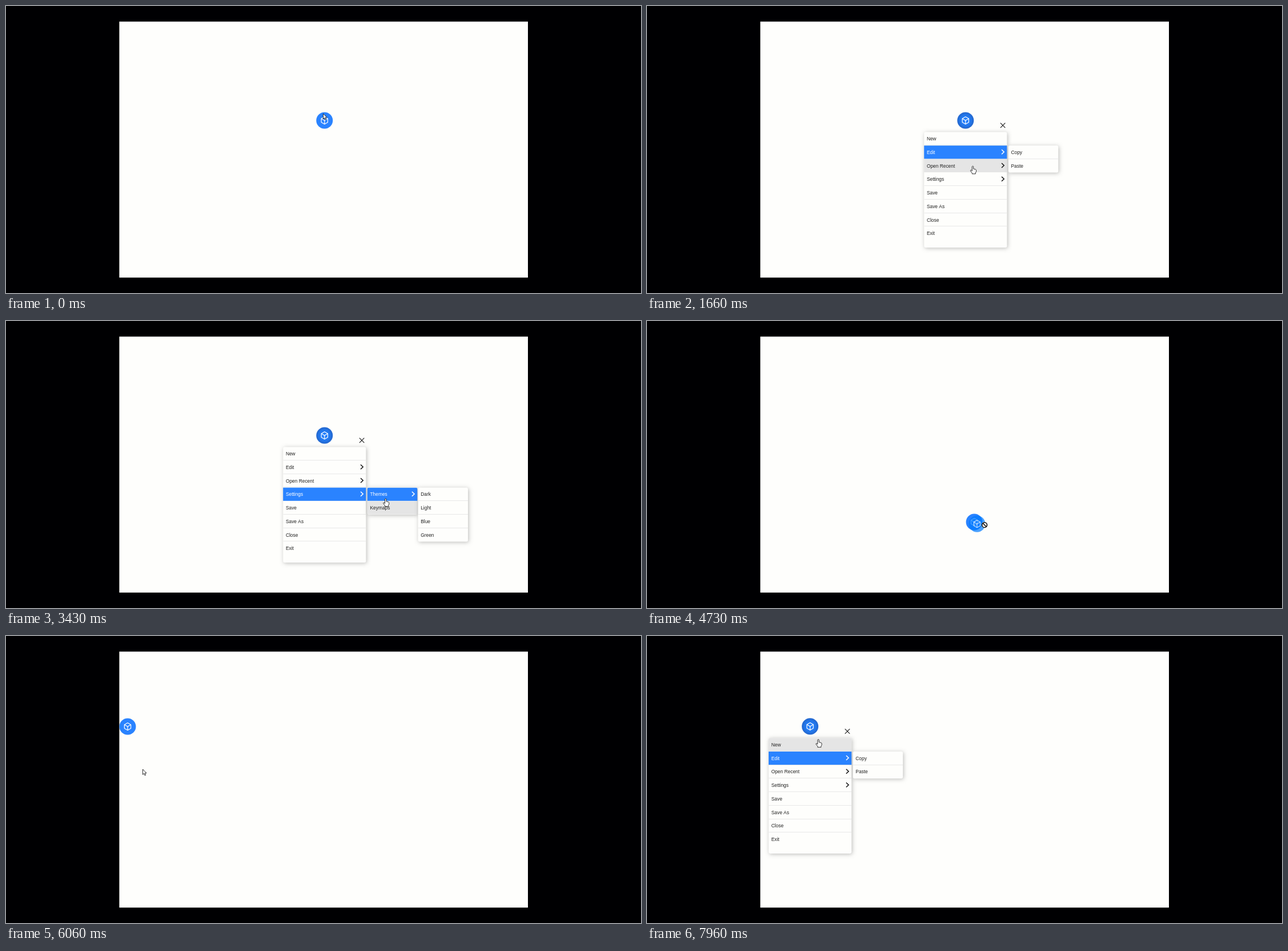
These frames come from a looping animation (1112 by 504 pixels, 8 s). An HTML page with a canvas:

```html
<!DOCTYPE html>
<html lang="en">
<head>
<meta charset="utf-8">
<title>Floating menu</title>
<style>
html, body { margin: 0; width: 100%; height: 100%; overflow: hidden; background: #000002; }
canvas { display: block; }
</style>
</head>
<body>
<canvas id="stage" width="1112" height="504"></canvas>
<script>
const ctx = document.getElementById('stage').getContext('2d');
const LOOP = 8000, LAG = 30, ROW = 23.75;
const PAPER = '#fefefc', BLUE = '#2a83ff', INK = '#222';
const DRAG = { from: 4430, to: 5390, dx: -13.2, dy: -2 };

const MAIN = ['New', 'Edit', 'Open Recent', 'Settings', 'Save', 'Save As', 'Close', 'Exit'];
const EDIT = ['Copy', 'Paste'];
const SETTINGS = ['Themes', 'Keymaps'];
const THEMES = ['Dark', 'Light', 'Blue', 'Green'];
const PARENTS = ['Edit', 'Open Recent', 'Settings', 'Themes'];

// each gesture runs from the last resting place through evenly timed points
const HOME = [555.5, 189];
const GESTURES = [
  { from: 900, to: 1660, via: [[577, 301], [571, 257], [570.5, 281]] },
  { from: 1930, to: 2730, via: [[578, 302], [706, 332], [690, 332]] },
  { from: 2760, to: 3560, via: [[678, 318], [664, 306], [662, 304], [669.5, 324.7], [637, 237]] },
  { from: 3600, to: 4360, via: [[623, 209], [623, 209], [571, 203]] },
  { from: DRAG.from, to: DRAG.to,
    via: [[565, 330], [592.5, 361], [575, 386], [400, 270], [266, 161], [226.2, 161]] },
  { from: 5600, to: 6060, via: [[239.5, 234]] },
  { from: 6130, to: 6260, via: [[207, 153]] },
  { from: 6900, to: 7360, via: [[222, 170], [258.3, 262]] },
  { from: 7360, to: 7660, via: [[290, 249.5]] },
  { from: 7730, to: 7960, via: [[296, 218], [300, 181.5]] }
];

// smooth curve through points, at rest at both ends
function spline(points, k) {
  const last = points.length - 1;
  const i = Math.min(last - 1, Math.floor(k * last)), u = k * last - i;
  const slope = (j, c) => j === 0 || j === last ? 0 : (points[j + 1][c] - points[j - 1][c]) / 2;
  const h = u * u * (3 - 2 * u);
  return [0, 1].map(c => points[i][c] * (1 - h) + points[i + 1][c] * h
    + u * (1 - u) * ((1 - u) * slope(i, c) - u * slope(i + 1, c)));
}

function pointer(t) {
  let rest = HOME;
  for (const g of GESTURES) {
    if (t < g.from) break;
    rest = spline([rest, ...g.via], Math.min(1, (t - g.from) / (g.to - g.from)));
  }
  return { x: rest[0], y: rest[1] };
}

function menuOrigin(t) {
  if (t >= 360 && t < 3860) return { x: 485.4, y: 221.2 };
  if (t >= 6600) return { x: 213.2, y: 179 };
  return null;
}

function panels(t) {
  const o = menuOrigin(t);
  if (!o) return [];
  const edit = (t >= 1430 && t < 2200) || t >= 7850;
  const settings = t >= 2200 && t < 3860;
  const themes = settings && t >= 3150;
  const list = [{ x: o.x, y: o.y, w: 145, h: 203, items: MAIN, sel: edit ? 1 : settings ? 3 : -1 }];
  const sub = (x, row, items, sel) =>
    list.push({ x: o.x + x, y: o.y + row * ROW, w: 87.3, h: items.length * ROW, items, sel });
  if (edit) sub(147.6, 1, EDIT, -1);
  if (settings) sub(147.6, 3, SETTINGS, themes ? 0 : -1);
  if (themes) sub(236.3, 3, THEMES, -1);
  return list;
}

const inside = (p, b) => p.x >= b.x && p.x < b.x + b.w && p.y >= b.y && p.y < b.y + b.h;

function stroke(points, color, width, close) {
  ctx.beginPath();
  points.forEach(([x, y]) => ctx.lineTo(x, y));
  if (close) ctx.closePath();
  ctx.strokeStyle = color;
  ctx.lineWidth = width;
  ctx.stroke();
}

function drawPanel(b, p) {
  ctx.save();
  ctx.beginPath();
  ctx.roundRect(b.x - .2, b.y, b.w + .2, b.h, 3);
  ctx.fillStyle = PAPER;
  ctx.shadowColor = 'rgba(0,0,0,.26)';
  ctx.shadowBlur = 7;
  ctx.shadowOffsetX = ctx.shadowOffsetY = 1.2;
  ctx.fill();
  ctx.shadowColor = 'transparent';
  ctx.clip();
  const hover = inside(p, b) ? Math.floor((p.y - b.y) / ROW) : -1;
  b.items.forEach((label, i) => {
    const y = b.y + i * ROW, mid = y + ROW / 2, on = i === b.sel;
    if (i < b.items.length - 1) {
      ctx.fillStyle = '#e8e8e8';
      ctx.fillRect(b.x, Math.round(y + ROW) - 1, b.w, 1);
    }
    if (on || i === hover) {
      ctx.fillStyle = on ? BLUE : '#e5e5e5';
      ctx.fillRect(b.x - 1, y + .2, b.w + 2, ROW - .6);
    }
    ctx.fillStyle = on ? '#fff' : INK;
    ctx.fillText(label, b.x + 4.5, Math.round(mid + 3));
    if (PARENTS.includes(label)) {
      const x = b.x + b.w - 9.4;
      stroke([[x, mid - 4.6], [x + 4.2, mid - .6], [x, mid + 3.4]], on ? '#fff' : '#111', 1.5);
    }
  });
  ctx.restore();
}

function drawButton(x, y, fill) {
  ctx.beginPath();
  ctx.arc(x, y, 14.5, 0, 7);
  ctx.fillStyle = fill;
  ctx.fill();
  const hex = [0, 1, 2, 3, 4, 5].map(i => {
    const a = (i * 60 - 90) * Math.PI / 180;
    return [x + 6.5 * Math.cos(a), y + 6.5 * Math.sin(a)];
  });
  ctx.lineJoin = 'round';
  stroke(hex, '#fff', 1.2, true);
  stroke([hex[5], [x, y], hex[1]], '#fff', 1.2);
  stroke([[x, y], hex[3]], '#fff', 1.2);
  ctx.lineJoin = 'miter';
}

function openFill(x, y) {
  const g = ctx.createRadialGradient(x, y, 2, x, y, 14.5);
  g.addColorStop(0, '#2682ff');
  g.addColorStop(.55, '#2379ee');
  g.addColorStop(1, '#2366cc');
  return g;
}

const ARROW = new Path2D('M0 0V9.3L2.1 7.4L3.7 10.9L5.2 10.2L3.7 6.8H6.6Z');
const HAND = new Path2D('M-1.2 .9Q0 -.9 1.2 .9V5L4.9 5.9Q6 6.3 6 7.6V9.8L4.8 12V13.8H-1.2V12.2' +
  'L-4 8.6Q-4.4 7 -2.9 7.1L-1.2 8.6Z');

function drawShape(path, p) {
  ctx.save();
  ctx.translate(p.x, p.y);
  ctx.fillStyle = '#fff';
  ctx.strokeStyle = '#1a1a1a';
  ctx.lineWidth = .9;
  ctx.fill(path);
  ctx.stroke(path);
  ctx.restore();
}

function drawBlocked(p) {
  ctx.beginPath();
  ctx.arc(p.x, p.y, 5.4, 0, 7);
  ctx.fillStyle = '#fff';
  ctx.fill();
  ctx.beginPath();
  ctx.arc(p.x, p.y, 4.4, 0, 7);
  ctx.strokeStyle = '#000';
  ctx.lineWidth = 1.5;
  ctx.stroke();
  stroke([[p.x - 3.1, p.y - 3.1], [p.x + 3.1, p.y + 3.1]], '#000', 1.5);
}

function draw(t) {
  ctx.fillStyle = '#000002';
  ctx.fillRect(0, 0, 1112, 504);
  ctx.fillStyle = PAPER;
  ctx.fillRect(198.4, 27.4, 715.6, 449.5);
  ctx.font = '8.4px "Liberation Sans", Arial, sans-serif';

  const p = pointer(t), late = pointer(t - LAG), o = menuOrigin(t);
  const held = pointer(Math.max(DRAG.from, Math.min(DRAG.to, t - LAG)));
  const bx = o ? o.x + 72.4 : held.x + DRAG.dx;
  const by = o ? o.y - 20.2 : held.y + DRAG.dy;
  drawButton(bx, by, o ? openFill(bx, by) : BLUE);

  const list = panels(t);
  list.forEach(b => drawPanel(b, late));
  let overClose = false;
  if (o) {
    const x = o.x + 137.7, y = o.y - 11.6, r = 4.2;
    stroke([[x - r, y - r], [x + r, y + r]], '#222', 1.2);
    stroke([[x - r, y + r], [x + r, y - r]], '#222', 1.2);
    overClose = Math.hypot(p.x - x, p.y - y) < 8;
  }

  if (t >= DRAG.from + LAG && t < DRAG.to) {
    ctx.globalAlpha = .7;
    drawButton(p.x + DRAG.dx, p.y + DRAG.dy, '#007bff');
    ctx.globalAlpha = 1;
    drawBlocked(p);
  } else {
    drawShape(overClose || list.some(b => inside(p, b)) ? HAND : ARROW, p);
  }
}

const start = performance.now();
function tick() {
  draw((performance.now() - start) % LOOP);
  requestAnimationFrame(tick);
}
tick();
</script>
</body>
</html>
```
